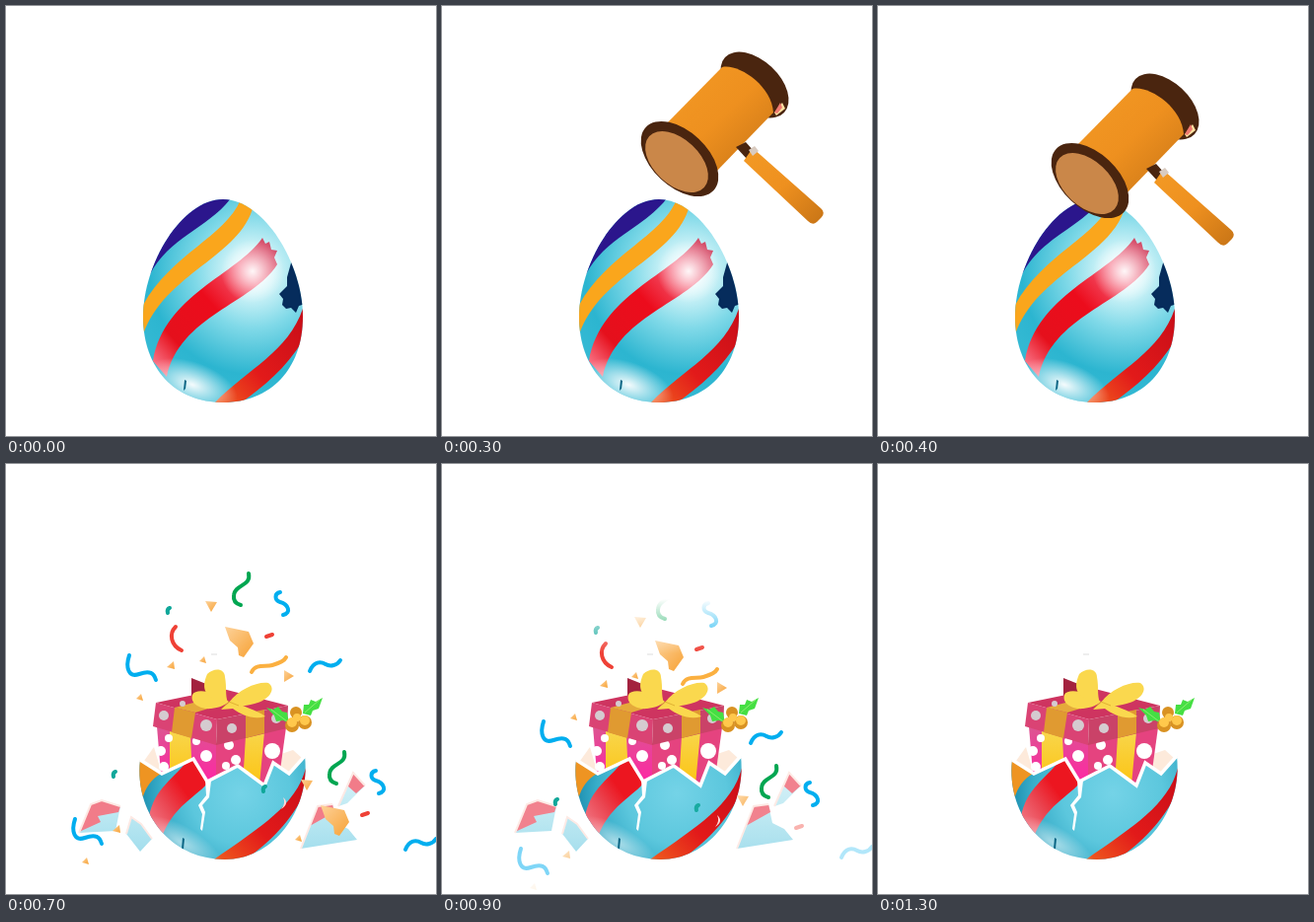
These frames come from a looping animation (436x436 px, 3.3 s). An HTML page:

```html
<!DOCTYPE html>
<html lang="en">
<head>
<meta charset="utf-8">
<title>Egg surprise</title>
<style>
  html, body { margin: 0; width: 100%; height: 100%; overflow: hidden; background: #fff; }
  svg { display: block; width: 100%; height: 100%; }
</style>
</head>
<body>
<svg viewBox="0 0 436 436">
  <defs>
    <radialGradient id="shell" gradientUnits="userSpaceOnUse" cx="250" cy="269" r="145">
      <stop offset="0" stop-color="#fff"/><stop offset=".15" stop-color="#d5f5f9"/>
      <stop offset=".4" stop-color="#80d9e8"/><stop offset=".72" stop-color="#2cb5d0"/>
      <stop offset="1" stop-color="#38bbd5"/>
    </radialGradient>
    <radialGradient id="bowl" gradientUnits="userSpaceOnUse" cx="238" cy="334" r="102">
      <stop offset="0" stop-color="#74d3e7"/><stop offset=".5" stop-color="#5cc7dd"/>
      <stop offset=".8" stop-color="#38adc9"/><stop offset="1" stop-color="#1e8fb0"/>
    </radialGradient>
    <radialGradient id="shine">
      <stop offset="0" stop-color="#fff" stop-opacity=".95"/><stop offset="1" stop-color="#fff" stop-opacity="0"/>
    </radialGradient>
    <linearGradient id="redBand" x1="1" y1="0" x2="0" y2="1">
      <stop offset="0" stop-color="#c94763"/><stop offset=".25" stop-color="#f5607a"/><stop offset=".5" stop-color="#ec0c1c"/>
      <stop offset=".78" stop-color="#e5101c"/><stop offset="1" stop-color="#ff8fa4"/>
    </linearGradient>
    <linearGradient id="bowlBand" x1="1" y1="0" x2="0" y2="1">
      <stop offset=".4" stop-color="#ec1620"/><stop offset=".62" stop-color="#ea4450"/><stop offset="1" stop-color="#f58d9b"/>
    </linearGradient>
    <linearGradient id="lowBand" x1="1" y1="0" x2="0" y2="1">
      <stop offset="0" stop-color="#c50c18"/><stop offset=".6" stop-color="#e21a1a"/><stop offset="1" stop-color="#f0601e"/>
    </linearGradient>
    <linearGradient id="wood" x1="0" y1="0" x2="1" y2="1">
      <stop offset="0" stop-color="#f39a25"/><stop offset=".5" stop-color="#ee901f"/><stop offset="1" stop-color="#c77416"/>
    </linearGradient>
    <linearGradient id="pink" x2="0" y2="1">
      <stop offset="0" stop-color="#dc5590"/><stop offset="1" stop-color="#ff25a5"/>
    </linearGradient>
    <linearGradient id="yellow" x2="0" y2="1">
      <stop offset="0" stop-color="#f8d64c"/><stop offset="1" stop-color="#fcc414"/>
    </linearGradient>
    <linearGradient id="gold" x1="0" y1="0" x2="1" y2="1">
      <stop offset="0" stop-color="#fdd29a"/><stop offset="1" stop-color="#f7a236"/>
    </linearGradient>
    <linearGradient id="ice" x2="0" y2="1">
      <stop offset="0" stop-color="#d8f3f8"/><stop offset="1" stop-color="#a3deed"/>
    </linearGradient>
    <linearGradient id="fade" gradientUnits="userSpaceOnUse" x1="0" y1="0" x2="0" y2="55">
      <stop offset="0" stop-color="#000"/><stop offset="1" stop-color="#fff"/>
    </linearGradient>
    <mask id="fadeTop" maskUnits="userSpaceOnUse" x="0" y="0" width="436" height="436">
      <path fill="url(#fade)" d="M0 0H436V436H0Z"/>
    </mask>
    <clipPath id="eggClip"><path d="M220 196C262 196 301 262 301 315C301 368 268 402 220 402C172 402 139 368 139 315C139 262 178 196 220 196Z"/></clipPath>
    <clipPath id="bowlClip"><path d="M136 300L158 314L190 299L204 322L235 306L262 326L271 303L287 314L303 296C309 350 272 401 222 401C168 401 130 355 136 300Z"/></clipPath>
  </defs>

  <g id="egg" clip-path="url(#eggClip)">
    <path fill="url(#shell)" d="M130 190H310V410H130Z"/>
    <path fill="#2b168c" d="M228 195C205 225 165 235 146 272L135 190Z"/>
    <path fill="#faa61c" d="M238 196C222 235 165 252 137 307V340C155 272 238 256 251 202Z"/>
    <path fill="url(#redBand)" d="M260 235L263 241L267 239L269 247L275 248L272 255L275 262C250 302 176 314 163 376L149 360C160 293 235 272 260 235Z"/>
    <path fill="#062c5c" d="M290 257L303 285V302L297 304L294 311L289 306L284 307L280 303L281 297L277 292L285 284V275Z"/>
    <path fill="url(#lowBand)" d="M303 300C290 350 245 367 210 404H236C260 387 285 367 303 336Z"/>
    <circle cx="250" cy="269" r="32" fill="url(#shine)"/>
    <ellipse cx="189" cy="384" rx="48" ry="23" fill="url(#shine)" transform="rotate(20 189 384)"/>
    <path fill="#0a6584" d="M180 390L181 379L183 380L182 388Z"/>
  </g>
  <g id="crack" fill="none" stroke="#fff" stroke-linejoin="round">
    <path stroke-width="2" d="M221 198L218 208L221 216L214 232L215 239L207 250L206 262M180 225L198 229L213 234M176 239L187 252L171 265L184 271L190 267L206 263M187 252L206 259M172 264L168 270"/>
    <path stroke-width="4" d="M206 262L215 276L216 289L230 299L219 314"/>
    <path stroke-width="3" d="M219 313L209 329L206 343L202 350L201 365"/>
  </g>

  <g id="hammer">
    <ellipse cx="317" cy="80" rx="41" ry="25" transform="rotate(43 317 80)" fill="#4a250f"/>
    <path fill="url(#wood)" d="M226 121L284 62C300 58 334 80 336 108L278 168Z"/>
    <path fill="#fee3a2" d="M345 98L348 104L339 111L337 108Z"/>
    <path fill="#ee7a70" d="M337 108L343 98L345 103L340 109Z"/>
    <ellipse cx="241" cy="155" rx="47" ry="28" transform="rotate(43 241 155)" fill="#4a250f"/>
    <ellipse cx="238" cy="158" rx="38" ry="23" transform="rotate(43 238 158)" fill="#ca8749"/>
    <path fill="#4a250f" d="M298 143L308 138L316 147L309 155Z"/>
    <path fill="url(#wood)" d="M315 144L384 205Q389 209 385 214L380 219Q376 223 371 218L306 157Z"/>
    <path fill="#d9cbc0" d="M311 146L317 142L321 147L315 152Z"/>
  </g>

  <g id="surprise">
    <path fill="#fdeadb" d="M140 301L150 287L158 314ZM273 304L279 294L291 290L301 299L287 314Z"/>
    <path fill="#a3223f" d="M188 217L203 223L210 238H188Z"/>
    <path fill="url(#pink)" d="M153 266L213 283V325H158Z"/>
    <path fill="#e5437f" d="M213 283L284 267L276 325H213Z"/>
    <path fill="url(#yellow)" d="M166 270L187 276L189 318H166ZM243 276L262 272L257 325H240Z"/>
    <g id="whiteDots" fill="#fff"></g>
    <path fill="#ce3460" d="M152 242L220 228L286 245L214 259Z"/>
    <path fill="#da4374" d="M152 242L214 259L213 285L149 266Z"/>
    <path fill="#ca4268" d="M214 259L286 245L285 268L213 285Z"/>
    <path fill="#e09a31" d="M171 247L192 252L188 278L168 272ZM243 253L262 249V273L243 278Z"/>
    <path fill="#e5aa3a" d="M171 247L194 241L215 245L192 252Z"/>
    <g id="greyDots" fill="#d5cbd0"></g>
    <g fill="#fad84e">
      <path d="M226 241C212 230 192 227 189 234C186 244 199 249 208 248C216 247 221 245 226 241Z"/>
      <path d="M218 249L228 240C240 246 254 249 263 256C251 260 238 254 230 248Z"/>
      <path d="M225 242C202 238 197 229 204 213C211 206 222 207 222 216C224 226 222 234 225 242Z"/>
      <path d="M226 242C236 228 256 220 266 222C275 228 266 240 252 243C241 246 232 247 226 242Z"/>
    </g>
    <path fill="none" stroke="#d9a72d" stroke-width=".8" d="M219 248L226 241L236 245"/>
    <path fill="#45df43" d="M264 247L271 249L276 246L280 251L285 252L287 263L281 260L274 261L272 255ZM301 253L302 244L307 244L309 239L314 241L321 237L317 248L311 250L309 255Z"/>
    <path fill="none" stroke="#8bed70" d="M269 249L285 261M303 252L318 239"/>
    <g fill="#d99222"><circle cx="294" cy="252" r="6"/><circle cx="290" cy="265" r="7"/><circle cx="303" cy="262" r="7"/></g>
    <g fill="#ffc84c"><circle cx="295" cy="257" r="4"/><circle cx="290" cy="262" r="5"/><circle cx="303" cy="260" r="5"/></g>
    <path stroke="#ddd" d="M208 193H214"/>
    <g clip-path="url(#bowlClip)">
      <path fill="url(#bowl)" d="M130 290H310V405H130Z"/>
      <path fill="#ee9422" d="M130 294L157 314C147 320 142 327 138 340L130 330Z"/>
      <path fill="url(#bowlBand)" d="M190 296L206 321C196 337 168 345 156 384L144 364C148 331 165 324 186 299Z"/>
      <path fill="url(#lowBand)" d="M306 298C300 343 262 365 208 403H240C266 385 290 363 306 327Z"/>
      <ellipse cx="178" cy="384" rx="46" ry="17" fill="url(#shine)" opacity=".6" transform="rotate(30 178 384)"/>
      <path fill="#0a6584" d="M178 391L179 379L181 380L180 390Z"/>
    </g>
    <path fill="none" stroke="#fff" stroke-width="3.5" d="M136 300L158 314L190 299L204 322L235 306L262 326L271 303L287 314L303 296"/>
    <path fill="#fff" d="M202 320L208 321L206 338L199 346L202 353L199 372L197 370L199 355L195 346L203 336Z"/>
  </g>

  <g id="shards">
    <path fill="url(#ice)" d="M74 374L86 345L97 341L116 347L111 372ZM122 375L127 358L137 365L148 380L136 393ZM352 313L364 326L346 344L337 347ZM299 390L316 347L331 345L335 364L347 370L356 381Z"/>
    <path fill="#f17c89" d="M74 373L86 345L97 341L116 347L114 353L93 357L96 363ZM352 313L364 326L355 334L346 326ZM316 347L331 345L333 353L308 367Z"/>
    <path fill="none" stroke="#fde9e4" stroke-width="2" d="M74 374L86 345L97 341L116 347M122 375L127 358L137 365L148 380M337 347L352 313L364 326M299 390L316 347L331 345"/>
  </g>
  <g id="confetti" mask="url(#fadeTop)"></g>
</svg>
<script>
const $ = id => document.getElementById(id);
const SVG = 'http://www.w3.org/2000/svg';

function add(parent, tag, attrs) {
  const node = document.createElementNS(SVG, tag);
  for (const key in attrs) node.setAttribute(key, attrs[key]);
  return parent.appendChild(node);
}
function dots(id, list) {
  for (const [cx, cy, r] of list) add($(id), 'circle', { cx, cy, r });
}
dots('whiteDots', [[157, 291, 5], [165, 278, 4], [203, 296, 6], [193, 281, 4], [226, 285, 5],
  [233, 300, 5], [270, 291, 8], [223, 306, 4], [194, 311, 4], [160, 307, 5]]);
dots('greyDots', [[160, 255, 5], [203, 265, 6], [229, 268, 5], [274, 258, 5], [179, 243, 3]]);

// Each piece: path, colour, and whether it is filled.
const pieces = {
  ribbon: ['M246 111C249 124 232 122 231 133Q230 141 238 143', '#00a651'],
  hook: ['M278 130C272 131 272 138 278 140C286 142 290 151 281 153', '#00aeef'],
  chip: ['M166 146Q163 147 164 151', '#10a79a'],
  top: ['M202 139L214 140L208 150Z', 'url(#gold)', true],
  arc: ['M172 165C165 172 167 184 178 189', '#ef4136'],
  swirl: ['M125 194C121 206 124 217 135 213S150 212 152 219', '#00aeef'],
  wave: ['M308 210C312 200 319 200 324 203S336 204 339 199', '#00aeef'],
  speck: ['M132 238L137 233L139 240Z', 'url(#gold)', true],
  fleck: ['M163 206L170 200L171 208Z', 'url(#gold)', true],
  bit: ['M196 200L201 195L203 202Z', 'url(#gold)', true],
  foil: ['M222 165L246 170L251 182L241 196L236 194L235 186L227 179Z', 'url(#gold)', true],
  streamer: ['M249 211C253 202 263 206 270 204S282 200 284 196', '#fbb040'],
  dash: ['M264 175L270 173', '#ef4136'],
  arrow: ['M282 209L292 215L282 221Z', 'url(#gold)', true],
  curl: ['M184 157Q191 163 182 169Q187 163 184 157Z', '#ffd9d9', true],
};
// Each burst: offset, then piece name, drift per step, and opacity on the two falling steps.
const bursts = [
  [0, 0, [
    ['ribbon', -12, 14, 1, 1], ['hook', -8, 11, 1, 1], ['chip', -8, 20, 1, 1], ['top', -7, 16, 1, 1],
    ['arc', -6, 17, 1, 1], ['swirl', -22, 67, 1, .3], ['wave', 5, 73, 1, .3], ['speck', -2, 20, 1, .3],
    ['fleck', -3, 19, 1, .3], ['bit', -4, 16, 1, 1], ['foil', -6, 14, 1, 1], ['streamer', -5, 12, 1, 1],
    ['dash', -6, 13, 1, 1], ['arrow', -3, 12, 1, 1]]],
  [97, 181, [
    ['ribbon', -4, 14, 1, .4], ['hook', -2, 12, 1, .4], ['chip', -3, 19, .9, .4], ['top', 0, 16, .8, .3],
    ['wave', 0, 8, .3, .1], ['bit', 0, 14, 0, 0], ['foil', 0, 13, 0, 0], ['dash', -2, 13, .4, .1],
    ['curl', -2, 18, 1, .4]]],
  [-55, 166, [
    ['chip', 6, 28, 1, .4], ['swirl', 10, 30, .5, .1], ['fleck', 14, 26, .5, .1], ['speck', 12, 26, .1, 0]]],
];
const confetti = bursts.flatMap(([x, y, list], burst) => list.map(([name, dx, dy, ...fade]) => {
  const [d, color, filled] = pieces[name];
  const style = filled ? { fill: color }
    : { fill: 'none', stroke: color, 'stroke-width': 4, 'stroke-linecap': 'round' };
  return { node: add($('confetti'), 'path', { d, ...style }), burst, x, y, dx, dy, fade: [1, ...fade] };
}));

function show(id, opacity) { $(id).setAttribute('opacity', Number(opacity)); }
function move(node, x, y, attribute = 'transform') { node.setAttribute(attribute, `translate(${x} ${y})`); }

function draw(t) {
  const open = t >= 700;
  show('egg', !open);
  show('crack', t >= 500 && !open);
  show('surprise', open);

  const swing = Math.floor(t / 100) - 3;
  show('hammer', t >= 200 && t < 500);
  move($('hammer'), -26 * swing, 22 * swing);

  const bursting = t >= 500 && t < 1300;
  const step = Math.max(0, Math.floor((t - 700) / 200));
  show('shards', open && bursting ? [1, .95, .35][step] : 0);
  show('confetti', bursting);
  if (!bursting) return;
  move($('fade'), 0, [-60, 137, 233][step], 'gradientTransform');
  for (const p of confetti) {
    move(p.node, open ? p.x + p.dx * step : p.x - 11, open ? p.y + p.dy * step : p.y + 51);
    p.node.setAttribute('opacity', open || p.burst === 0 ? p.fade[step] : 0);
  }
}

const start = performance.now();
function tick() {
  draw((performance.now() - start) % 3300);
  requestAnimationFrame(tick);
}
tick();
</script>
</body>
</html>
```
